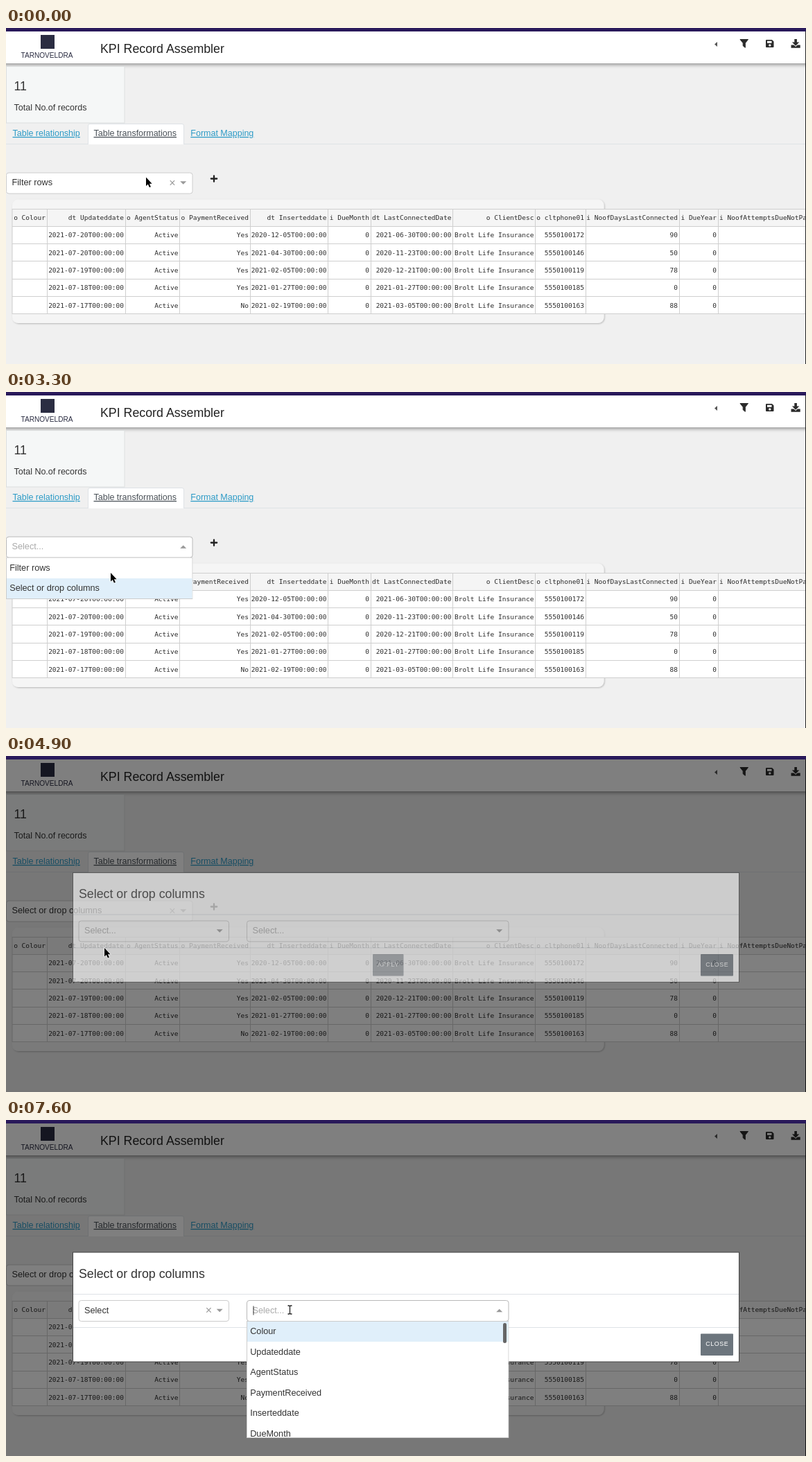
Animation of 1154x485 px, one loop 8000 ms. Source, as an HTML page:

```html
<!DOCTYPE html>
<html lang="en">
<head>
<meta charset="utf-8">
<title>Table transformations</title>
<style>
  html, body { margin: 0; width: 100%; height: 100%; overflow: hidden; background: #f0f0f0; }
  svg { display: block; width: 100%; height: 100%; font-family: "Liberation Sans", Arial, sans-serif; }
  text { white-space: pre; }
  .mono { font-family: "DejaVu Sans Mono", monospace; }
</style>
</head>
<body>
<svg id="stage" viewBox="0 0 1154 485">
  <defs>
    <filter id="barShadow" x="-5%" y="-20%" width="110%" height="170%">
      <feDropShadow dx="0" dy="2.5" stdDeviation="2.6" flood-opacity=".36"/>
    </filter>
    <filter id="panelShadow" x="-5%" y="-5%" width="110%" height="110%">
      <feDropShadow dx="1" dy="1" stdDeviation="1" flood-opacity=".25"/>
    </filter>
  </defs>
  <g id="page"></g>
  <g id="live"></g>
</svg>
<script>
const LOOP = 8000, STEP = 100;
const INK = '#333', HINT = '#aaa', LINE = '#dee2e6', HOVER = '#e0effa';
const BODY = 12.5, FIELD = 12.7, TITLE = 17.8, OPTION_H = 29.5;

const rect = (x, y, w, h, fill, extra = '') =>
  `<rect x="${x}" y="${y}" width="${w}" height="${h}" fill="${fill}" ${extra}/>`;
const path = (d, fill, extra = '') => `<path d="${d}" fill="${fill}" ${extra}/>`;
const text = (x, y, str, size, fill = INK, extra = '') =>
  `<text x="${x}" y="${y}" font-size="${size}" fill="${fill}" ${extra}>${str}</text>`;
const stroked = (d, color, width = 1) => path(d, 'none', `stroke="${color}" stroke-width="${width}"`);

// --- Fixed page ---------------------------------------------------------

const columns = [
  [59, 'o Colour', ''],
  [172, 'dt Updateddate', [20, 20, 19, 18, 17].map(d => `2021-07-${d}T00:00:00`)],
  [250.5, 'o AgentStatus', 'Active'],
  [352, 'o PaymentReceived', ['Yes', 'Yes', 'Yes', 'Yes', 'No']],
  [464.5, 'dt Inserteddate',
    ['2020-12-05', '2021-04-30', '2021-02-05', '2021-01-27', '2021-02-19'].map(d => d + 'T00:00:00')],
  [526, 'i DueMonth', '0'],
  [644.5, 'dt LastConnectedDate',
    ['2021-06-30', '2020-11-23', '2020-12-21', '2021-01-27', '2021-03-05'].map(d => d + 'T00:00:00')],
  [763.5, 'o ClientDesc', 'Brolt Life Insurance'],
  [836, 'o cltphone01', ['5550100172', '5550100146', '5550100119', '5550100185', '5550100163']],
  [971, 'i NoofDaysLastConnected', ['90', '50', '78', '0', '88']],
  [1027, 'i DueYear', '0'],
  [1168.5, 'i NoofAttemptsDueNotPaid', '']
];

function table() {
  const top = 261, rowH = 25.3, bottom = top + 6 * rowH;
  const cell = (x, row, str) =>
    text(x - 2, top + 16 + row * rowH, str, 9.52, '#2a2a2a', 'class="mono" text-anchor="end"');
  let out = rect(9, top, 1145, rowH, '#f5f5f5') + rect(9, top + rowH, 1145, 5 * rowH, '#fff');
  for (let r = 0; r <= 6; r++) out += stroked(`M9 ${Math.floor(top + r * rowH) + .5}H1154`, '#cfcfcf');
  out += stroked(`M9 ${top}V${bottom}`, '#cfcfcf');
  for (const [x, head, values] of columns) {
    out += stroked(`M${Math.floor(x) + .5} ${top}V${bottom}`, '#cfcfcf') + cell(x, 0, head);
    for (let r = 0; r < 5; r++) out += cell(x, r + 1, Array.isArray(values) ? values[r] : values);
  }
  return out;
}

function icons() {
  const c = '#2b2b2b';
  return path('M1026 20V27L1022 23.5Z', '#555') +
    path('M1059 16.5H1070.5L1066.3 21.8V28.3L1063.2 25.8V21.8Z', c, `stroke="${c}" stroke-linejoin="round"`) +
    path('M1097 17H1105L1107.5 19.5V27Q1107.5 28 1106.5 28H1097Q1096 28 1096 27V18Q1096 17 1097 17Z' +
      'M1098 18.7V21.8H1104.5V18.7ZM1101.8 23.2A1.7 1.7 0 1 0 1101.8 26.6A1.7 1.7 0 1 0 1101.8 23.2Z',
      c, 'fill-rule="evenodd"') +
    path('M1137.3 16H1140.9V20.5H1144.3L1139.1 25.7L1133.9 20.5H1137.3Z', c) +
    path('M1132.5 24.5H1136.5L1139.1 27L1141.7 24.5H1145.7V28.8H1132.5Z', c);
}

function tabs() {
  const link = (x, str, color) => text(x, 156, str, BODY, color, 'text-decoration="underline"');
  return stroked('M0 167.5H1154', LINE) +
    path('M118.5 168V141Q118.5 138.5 121 138.5H254Q256.5 138.5 256.5 141V168', '#fff', `stroke="${LINE}"`) +
    link(9.5, 'Table relationship', '#2b9ac6') +
    link(126.5, 'Table transformations', '#495057') +
    link(266.3, 'Format Mapping', '#2b9ac6');
}

document.getElementById('page').innerHTML =
  rect(0, 0, 1154, 485, '#f0f0f0') +
  rect(-10, 5, 1174, 46, '#fff', 'filter="url(#barShadow)"') +
  rect(0, 0, 1154, 5, '#29195a') +
  rect(50, 10, 20, 20, '#2b2d42') +
  text(21.5, 43, 'TARNOVELDRA', 10.1, '#2b2d42') +
  text(136, 36, 'KPI Record Assembler', TITLE, '#222') +
  icons() +
  rect(.5, 55.5, 170.5, 81.5, '#f5f7f7', 'stroke="#dcdfdf"') +
  text(11.5, 90, '11', TITLE) +
  text(11.5, 119, 'Total No.of records', BODY) +
  tabs() +
  path('M300 213.3V221.7M295.8 217.5H304.2', 'none', 'stroke="#222" stroke-width="2.3" stroke-linecap="round"') +
  rect(9, 247.5, 853.5, 178.5, '#f5f5f5', 'rx="8.5" filter="url(#panelShadow)"') +
  table();

// --- Form parts ---------------------------------------------------------

function selectBox(x, y, w, { value, open, caret, hotClear }) {
  const right = x + w, mid = y + 14.5, d = open ? -1 : 1;
  let out = rect(x, y, w, 30, '#fff', `rx="3.5" stroke="${open ? '#b8b8b8' : '#ccc'}"`) +
    text(x + 8, y + 18, value || 'Select...', FIELD, value ? INK : HINT) +
    path(`M${right - 17.8} ${mid - 2.2 * d}h9l-4.5 ${4.5 * d}z`, '#999');
  if (value) out += text(right - 29, mid + 5, '×', 16, hotClear ? '#d0433a' : '#999', 'text-anchor="middle"');
  if (caret) out += stroked(`M${x + 9.5} ${y + 8}v13`, '#333');
  return out;
}

function menu(x, y, w, h, options, active) {
  let out = rect(x, y, w, h, '#fff', 'stroke="#ccc"');
  options.forEach((name, i) => {
    const top = y + i * OPTION_H;
    if (i === active) out += rect(x + .5, top + .5, w - 1, OPTION_H - .5, HOVER);
    out += text(x + 4.7, top + 18.7, name, FIELD);
  });
  return `<svg overflow="hidden" x="${x - .5}" y="${y - .5}" width="${w + 1}" height="${h + 1}" ` +
    `viewBox="${x - .5} ${y - .5} ${w + 1} ${h + 1}">${out}</svg>`;
}

function button(x, w, label, opacity) {
  return `<g opacity="${opacity}">` + rect(x, 308.5, w, 31.5, '#6c757d', 'rx="1"') +
    text(x + w / 2 + .3, 326.3, label, 8.9, '#fff', 'text-anchor="middle" letter-spacing=".6"') + '</g>';
}

function modal(t) {
  const p = Math.min(1, (t - 4800) / 300);
  const shift = -45 * (1 - p) ** 1.7;
  const alpha = Math.min(1, (t - 4800) / 160);
  const modeOpen = t >= 5900 && t < 6900, columnsOpen = t >= 7600;
  let out = rect(96.5, 191, 961, 158, '#fff', 'stroke="#444"') +
    text(105, 228, 'Select or drop columns', TITLE) +
    stroked('M97 251.5H1057M97 299.5H1057', LINE) +
    button(529, 44.5, 'APPLY', .65) + button(1002, 47, 'CLOSE', 1) +
    selectBox(105, 260.5, 216.5, { value: t >= 6900 && 'Select', open: modeOpen, caret: modeOpen && t < 6000 }) +
    selectBox(347.5, 260.5, 377.5, { open: columnsOpen, caret: columnsOpen });
  if (modeOpen) out += menu(105, 290.5, 216.5, 59.5, ['Select', 'Drop'], 0);
  if (columnsOpen) {
    const names = columns.slice(0, 6).map(c => c[1].split(' ')[1]);
    out += menu(347.5, 290.5, 377.5, 168, names, 0) + rect(717, 293, 5, 29, '#666', 'rx="2.5"');
  }
  return `<g opacity="${alpha}" transform="translate(0 ${shift})">${out}</g>`;
}

// --- Pointer ------------------------------------------------------------

// start time, number of steps, end x, end y
const moves = [
  [700, 3, 237, 222.5], [1900, 3, 252, 220], [3100, 3, 151, 261], [3500, 3, 142, 277],
  [5100, 2, 147.5, 274.5], [5300, 2, 240, 217], [5500, 2, 278, 268], [6200, 1, 278, 273],
  [6400, 1, 220, 305], [6700, 1, 218.5, 304.5], [6900, 3, 345, 281], [7300, 2, 409.5, 274]
];
const shapes = {
  arrow: 'M0 0V12.6L2.8 10L4.9 14.6L6.9 13.7L4.9 9.2H8.6Z',
  hand: 'M-1.3 1.2Q-1.3 0 0 0T1.3 1.2V5Q2.2 4 3.2 5.2Q4.3 4.4 5 5.8Q6.6 5.2 6.6 7V10L5.5 14H-1.5' +
    'L-5 8.5Q-4.6 6.6 -3 7.6L-1.3 9Z'
};

function pointer(t) {
  let x = 202, y = 215.5;
  for (const [start, steps, toX, toY] of moves) {
    if (t < start) break;
    const p = Math.min(1, ((t - start) / STEP + 1) / steps);
    x += (toX - x) * p;
    y += (toY - y) * p;
  }
  const shape = t >= 7400 ? 'beam' : t >= 900 && t < 3100 ? 'hand' : 'arrow';
  const drawing = shape === 'beam'
    ? stroked('M-3 -6H-1L0 -5L1 -6H3M0 -5V5M-3 6H-1L0 5L1 6H3', '#222', 1.3)
    : path(shapes[shape], '#000', 'stroke="#fff" stroke-width="1.1" paint-order="stroke"');
  return `<g transform="translate(${x} ${y})">${drawing}</g>`;
}

// --- Timeline -----------------------------------------------------------

function scene(t) {
  const value = t < 1800 ? 'Filter rows' : t >= 4400 ? 'Select or drop columns' : '';
  const open = t >= 2600 && t < 4400;
  const shade = Math.min(.5, Math.max(0, (t - 4655) / 290));
  let out = selectBox(.5, 209, 268.5, {
    value, open, caret: open && t < 2900, hotClear: t >= 900 && t < 1800
  });
  if (open) out += menu(.5, 239, 268.5, 59.5, ['Filter rows', 'Select or drop columns'], t >= 3200 ? 1 : 0);
  if (t >= 1500 && t < 1800) {
    out += rect(236.5, 242.5, 84.5, 36.5, '#111', 'rx="4" opacity=".92"') +
      text(247.5, 265.3, 'Clear value', 12.3, '#fff');
  }
  out += rect(1153, 5, 1, 480, '#222');
  if (shade) out += rect(0, 5, 1154, 480, '#000', `opacity="${shade}"`);
  if (t > 4800) out += modal(t);
  return out + pointer(t);
}

const live = document.getElementById('live');
let shown = -1;
function tick() {
  const t = Math.floor(performance.now() % LOOP / STEP) * STEP;
  if (t !== shown) live.innerHTML = scene(shown = t);
  requestAnimationFrame(tick);
}
tick();
</script>
</body>
</html>
```
